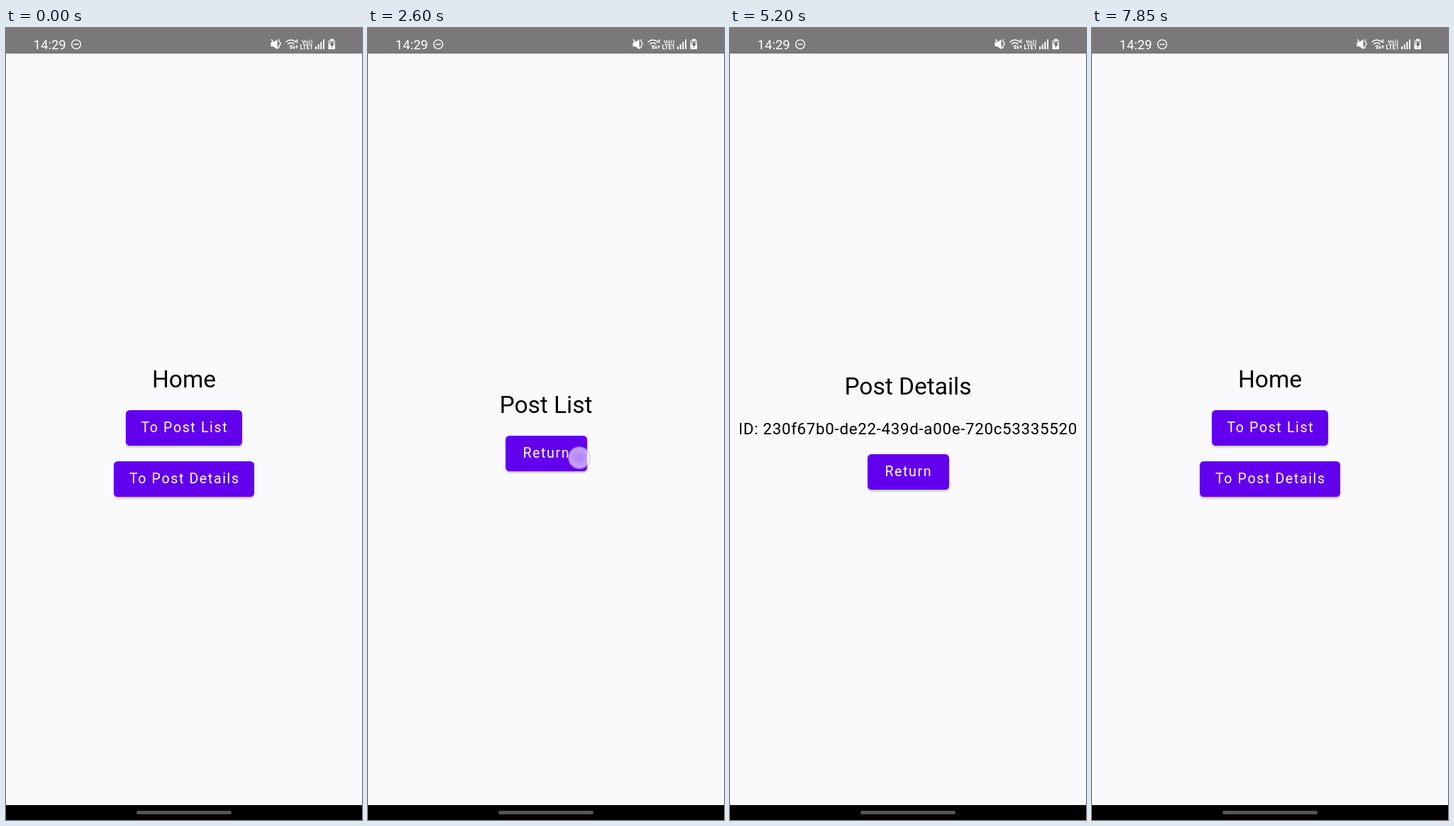
An HTML page for the animation above (8000 ms loop, 502 by 1115 pixels).

```html
<!DOCTYPE html>
<html lang="en">
<head>
<meta charset="utf-8">
<title>Screen navigation</title>
<style>
  html, body { margin: 0; width: 100%; height: 100%; overflow: hidden; background: #faf9fc; }
  body { position: relative; font-family: Roboto, sans-serif; color: #000; }
  .screen, .status, .line, .button, .clip, .ripple, .touch, .nav { position: absolute; }
  .screen { left: 0; top: 0; width: 502px; height: 1115px; opacity: 0; }
  .status { left: 0; top: 0; }
  .line { left: 0; width: 502px; text-align: center; white-space: nowrap; height: 40px; line-height: 40px; }
  .title { font-size: 33.5px; }
  .body { font-size: 22.3px; letter-spacing: .7px; }
  .button {
    height: 50px; line-height: 50px; border-radius: 5.5px; background: #6200ee; color: #fff;
    font-size: 19.5px; letter-spacing: 1.65px; text-indent: 1.65px;
    text-align: center; white-space: nowrap;
  }
  .clip { inset: 0; overflow: hidden; border-radius: inherit; }
  .ripple { border-radius: 50%; background: rgba(0, 0, 0, .12); opacity: 0; }
  .touch {
    width: 34px; height: 34px; margin: -17px 0 0 -17px; border-radius: 50%; opacity: 0;
    background: radial-gradient(circle closest-side, rgba(255,255,255,.56) 0, rgba(255,255,255,.7) 80%,
      rgba(215,205,230,.65) 88%, rgba(165,150,190,.45) 93%, rgba(165,150,190,0) 100%);
  }
  .nav { left: 0; top: 1094px; width: 502px; height: 21px; background: #000; }
  .nav::after {
    content: ""; position: absolute; left: 184px; top: 8px; width: 134px; height: 5px;
    border-radius: 3px; background: #555;
  }
</style>
</head>
<body>
<div class="screen" id="home">
  <div class="line title" style="top:474.5px">Home</div>
  <div class="button" id="toList" style="left:169px;top:538px;width:164px">To Post List</div>
  <div class="button" id="toDetails" style="left:152px;top:610px;width:198px">To Post Details</div>
</div>
<div class="screen" id="list">
  <div class="line title" style="top:510.5px">Post List</div>
  <div class="button" id="listReturn" style="left:193.5px;top:574px;width:115px">Return</div>
</div>
<div class="screen" id="details">
  <div class="line title" style="top:484.5px">Post Details</div>
  <div class="line body" style="top:543.5px">ID: 230f67b0-de22-439d-a00e-720c53335520</div>
  <div class="button" id="detailsReturn" style="left:193.5px;top:600px;width:115px">Return</div>
</div>

<svg class="status" width="502" height="36" fill="#fff" font-family="Roboto, sans-serif">
  <rect width="502" height="36" fill="#7a787a"/>
  <text x="38.5" y="30" font-size="18.6">14:29</text>
  <g fill="none" stroke="#fff" stroke-width="1.4">
    <circle cx="99" cy="23" r="6.4"/>
    <path d="M95.5 23h7"/>
    <path d="M374 16l10 13M386 16q-2.500 2 0 4t0 4t0 4"/>
    <path d="M394.500 20q7.500-6.500 14 0M397 23q5-4.500 9.500 0M399.500 26q2.500-2 5 0"/>
    <path d="M406 25v4m-1.500-1.500l1.500 1.500l1.500-1.500M410 29v-4m-1.500 1.500l1.500-1.500l1.500 1.500" stroke-width="1.100"/>
  </g>
  <path d="M373.500 20h3.500l5.500-4v14l-5.500-4h-3.500z"/>
  <circle cx="402" cy="28" r="1.500"/>
  <g font-weight="700">
    <text x="408" y="21" font-size="7">6</text>
    <text x="417" y="21.500" font-size="8">Vo))</text>
    <text x="414.500" y="30" font-size="8.400">LTE1</text>
  </g>
  <path d="M436 26h2v4h-2zM439.700 23h2v7h-2zM443.300 19.500h2v10.500h-2zM447 16h2v14h-2z"/>
  <path d="M457 17.500v-2h5v2h2v12.500h-9.500v-12.500z"/>
  <path d="M455 18h8.500v4h-8.500z" fill="#b5b4b5"/>
  <path d="M461 18.500l-4 5.500h2.500l-1.500 4.500l4.500-6h-2.800z" fill="#444"/>
</svg>
<div class="nav"></div>

<script>
const LOOP = 8000;
const REST = "0 2px 3px rgba(0,0,0,.24)";
const RAISED = "0 6px 10px rgba(0,0,0,.22)";
const byId = id => document.getElementById(id);

// Each key is [time in ms, value]; the last value holds until the loop ends.
function play(el, prop, keys) {
  const frames = [...keys, [LOOP, keys.at(-1)[1]]].map(([time, value]) => ({
    offset: time / LOOP, [prop]: value, easing: "cubic-bezier(.4,0,.2,1)"
  }));
  el.animate(frames, { duration: LOOP, iterations: Infinity });
}

function add(parent, className, style) {
  const el = document.createElement("div");
  el.className = className;
  Object.assign(el.style, style);
  parent.append(el);
  return el;
}

function tap({ id, x, y, down, lift, release }) {
  const button = byId(id);
  const { offsetWidth: w, offsetHeight: h } = button;
  const left = parseFloat(button.style.left), top = parseFloat(button.style.top);
  const radius = Math.hypot(w, h) / 2 + 14;
  const start = down + 30;

  const ripple = add(add(button, "clip"), "ripple", {
    left: `${w / 2 - radius}px`, top: `${h / 2 - radius}px`,
    width: `${2 * radius}px`, height: `${2 * radius}px`
  });
  const touched = `translate(${x - left - w / 2}px, ${y - top - h / 2}px) scale(${.3 * w / radius})`;
  play(ripple, "transform", [[0, touched], [start, touched], [start + 250, "translate(0px, 0px) scale(1)"]]);
  play(ripple, "opacity", [[0, 0], [start, 0], [start + 75, 1], [release, 1], [release + 150, 0]]);
  play(button, "boxShadow", [[0, REST], [start, REST], [start + 130, RAISED], [release, RAISED], [release + 150, REST]]);

  const touch = add(document.body, "touch", { left: `${x}px`, top: `${y}px` });
  play(touch, "opacity", [[0, 0], [down, 0], [down, .9], [down + 100, 1], [lift, 1], [lift, 0]]);
}

play(byId("home"), "opacity", [
  [0, 1], [1080, 1], [1400, 0], [3200, 0], [3450, 1], [4950, 1], [5200, 0], [7550, 0], [7850, 1]
]);
play(byId("list"), "opacity", [[0, 0], [1080, 0], [1400, 1], [3200, 1], [3450, 0]]);
play(byId("details"), "opacity", [[0, 0], [4950, 0], [5200, 1], [7550, 1], [7850, 0]]);

[
  { id: "toList", x: 314, y: 569, down: 500, lift: 1000, release: 1040 },
  { id: "listReturn", x: 298, y: 605, down: 2600, lift: 3250, release: 3210 },
  { id: "toDetails", x: 333, y: 641, down: 4250, lift: 5000, release: 4960 },
  { id: "detailsReturn", x: 303, y: 630, down: 6750, lift: 7450, release: 7560 }
].forEach(tap);
</script>
</body>
</html>
```
